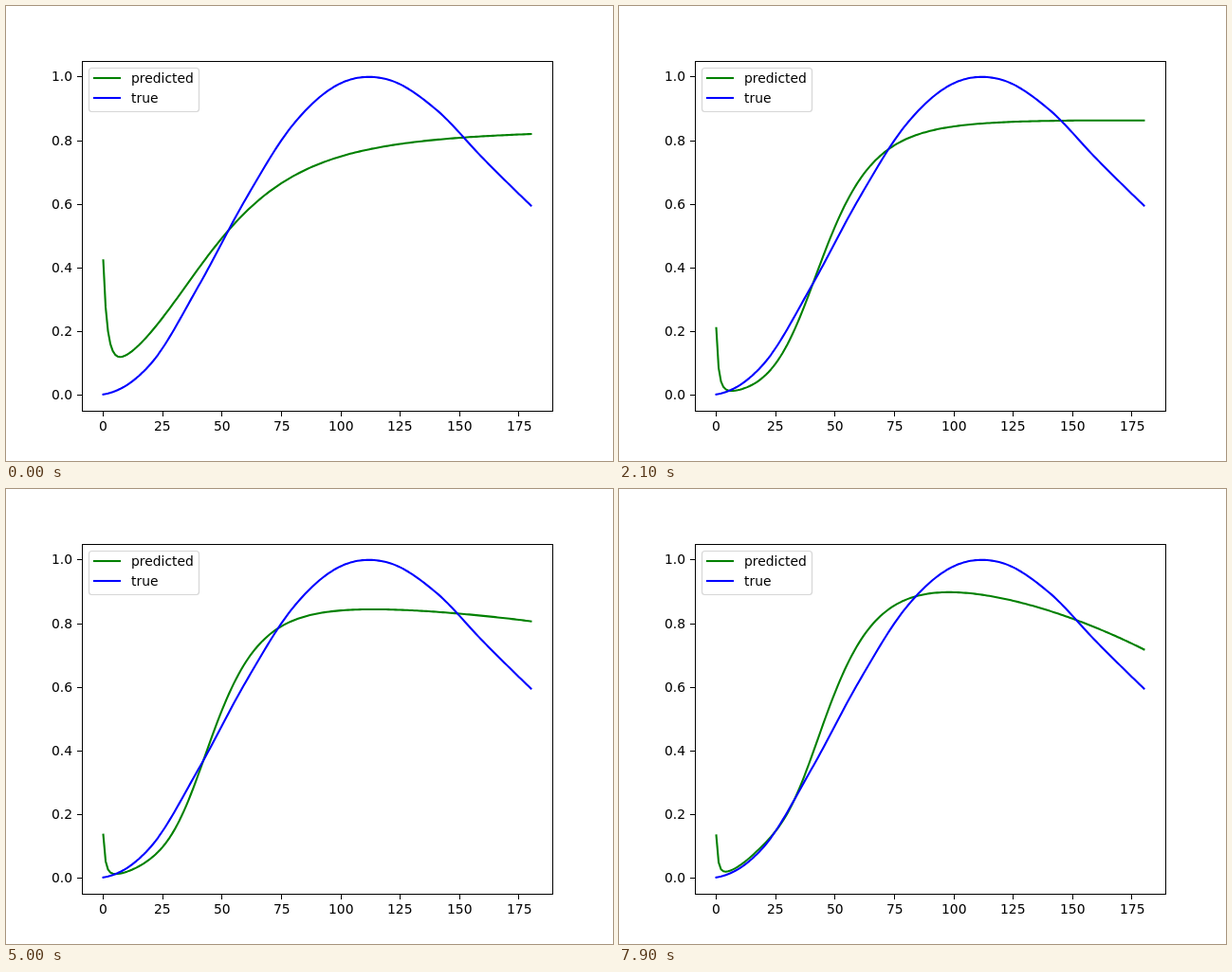
An HTML page with a canvas for the animation above (8000 ms loop, 640 px wide and 480 px high).

```html
<!DOCTYPE html>
<html lang="en">
<head>
<meta charset="utf-8">
<title>Curve fitting</title>
<style>
  html, body { margin: 0; width: 100%; height: 100%; overflow: hidden; background: #fff; }
  canvas { display: block; }
</style>
</head>
<body>
<canvas id="plot" width="640" height="480"></canvas>
<script>
const ctx = document.getElementById('plot').getContext('2d');
const LOOP = 8000, STEP = 100, LAST = 180;
const GREEN = '#008000', BLUE = '#0000ff';
const px = x => 102.545 + x * 2.50505;
const py = v => 410.4 - v * 336;

// The true curve, through key points 20 units apart.
const GAP = 20;
const keys = [.002, .098, .341, .616, .85, .979, .99, .897, .742, .595];

function trueCurve(x) {
  // Points beyond the ends continue the parabola of the last three.
  const key = i => i < 0 ? 3 * keys[0] - 3 * keys[1] + keys[2]
    : i < keys.length ? keys[i]
    : 3 * keys.at(-1) - 3 * keys.at(-2) + keys.at(-3);
  const i = Math.min(Math.floor(x / GAP), keys.length - 2), s = x / GAP - i;
  const [a, b, c, d] = [-1, 0, 1, 2].map(k => key(i + k));
  return b + s / 2 * (c - a + s * (2 * a - 5 * b + 4 * c - d + s * (3 * (b - c) + d - a)));
}

// The prediction is an early drop plus a bent logistic rise that fades at the end.
// time, start value, drop width, height, fade, middle, steepness, bend
const poses = [
  [0, .423, 6.8, .843, 0, 42.5, 4.75, 100],
  [700, .295, 4.8, .872, 0, 46.5, 5.85, 70],
  [2100, .21, 3.8, .872, .006, 45, 6.3, 70],
  [3900, .152, 3.6, .878, .027, 44.8, 6.6, 70],
  [5000, .136, 3.5, .88, .071, 45.5, 6.6, 70],
  [6000, .13, 3.5, .895, .176, 50.6, 5.76, 70],
  [7900, .134, 3, .995, .273, 45.5, 6, 70]
];

function fitAt(time) {
  let i = 0;
  while (i < poses.length - 2 && time >= poses[i + 1][0]) i++;
  const a = poses[i], b = poses[i + 1];
  const u = (time - a[0]) / (b[0] - a[0]);
  const k = i === 0 ? 1 - (1 - u) ** 2 : u;
  const [, start, width, height, fade, middle, steep, bend] = a.map((v, j) => v + (b[j] - v) * k);
  const bump = .04 * (time / LOOP) ** 2;
  // Training noise, which fades out at each pose.
  const noise = (.012 + .03 * time / LOOP) * Math.sin(Math.PI * u) * (Math.sin(time / STEP * 2.4) + .3);

  const rise = x => {
    const logit = steep * (1 - Math.exp((middle - x) / bend));
    const top = height - fade * (x / LAST) ** 2.5;
    return top / (1 + Math.exp(-logit)) + bump * Math.exp(-(((x - 20) / 9) ** 2) / 2);
  };
  const drop = start - rise(0);
  return x => (rise(x) + drop * (1 + x / width) ** -4) * (1 + noise);
}

function stroke(points, color) {
  ctx.beginPath();
  points.forEach(p => ctx.lineTo(...p));
  ctx.strokeStyle = color;
  ctx.lineWidth = 2.083;
  ctx.lineCap = 'square';
  ctx.lineJoin = 'round';
  ctx.stroke();
}

function curve(f, color) {
  stroke(Array.from({ length: LAST + 1 }, (_, x) => [px(x), py(f(x))]), color);
}

// Text starts on a whole pixel; shift is the part of its width left of x.
function text(s, x, y, shift = 0) {
  ctx.fillText(s, Math.round(x - ctx.measureText(s).width * shift), y);
}

function axes() {
  ctx.fillStyle = '#000';
  ctx.font = '13.889px "DejaVu Sans", sans-serif';
  for (let x = 0; x <= 175; x += 25) {
    ctx.fillRect(Math.floor(px(x)), 428, 1, 5);
    text(x, px(x), 448, .5);
  }
  for (let i = 0; i <= 5; i++) {
    const y = Math.round(py(i / 5));
    ctx.fillRect(75, y, 5, 1);
    text((i / 5).toFixed(1), 70.3, y + 5, 1);
  }
  ctx.strokeStyle = '#000';
  ctx.lineWidth = 1;
  ctx.lineJoin = 'miter';
  ctx.strokeRect(80.5, 58.5, 496, 369);
}

function legend() {
  ctx.beginPath();
  ctx.roundRect(87.5, 65.5, 116, 46, 3);
  ctx.fillStyle = 'rgba(255,255,255,.8)';
  ctx.fill();
  ctx.strokeStyle = '#d6d6d6';
  ctx.lineWidth = 1.2;
  ctx.stroke();
  [['predicted', GREEN], ['true', BLUE]].forEach(([name, color], i) => {
    const y = 76 + i * 21;
    stroke([[93, y], [120, y]], color);
    ctx.fillStyle = '#000';
    text(name, 131.6, y + 5);
  });
}

const begin = performance.now();

function draw(now) {
  const time = Math.floor(Math.max(0, now - begin) % LOOP / STEP) * STEP;
  ctx.fillStyle = '#fff';
  ctx.fillRect(0, 0, 640, 480);
  curve(fitAt(time), GREEN);
  curve(trueCurve, BLUE);
  axes();
  legend();
  requestAnimationFrame(draw);
}
draw(begin);
</script>
</body>
</html>
```
